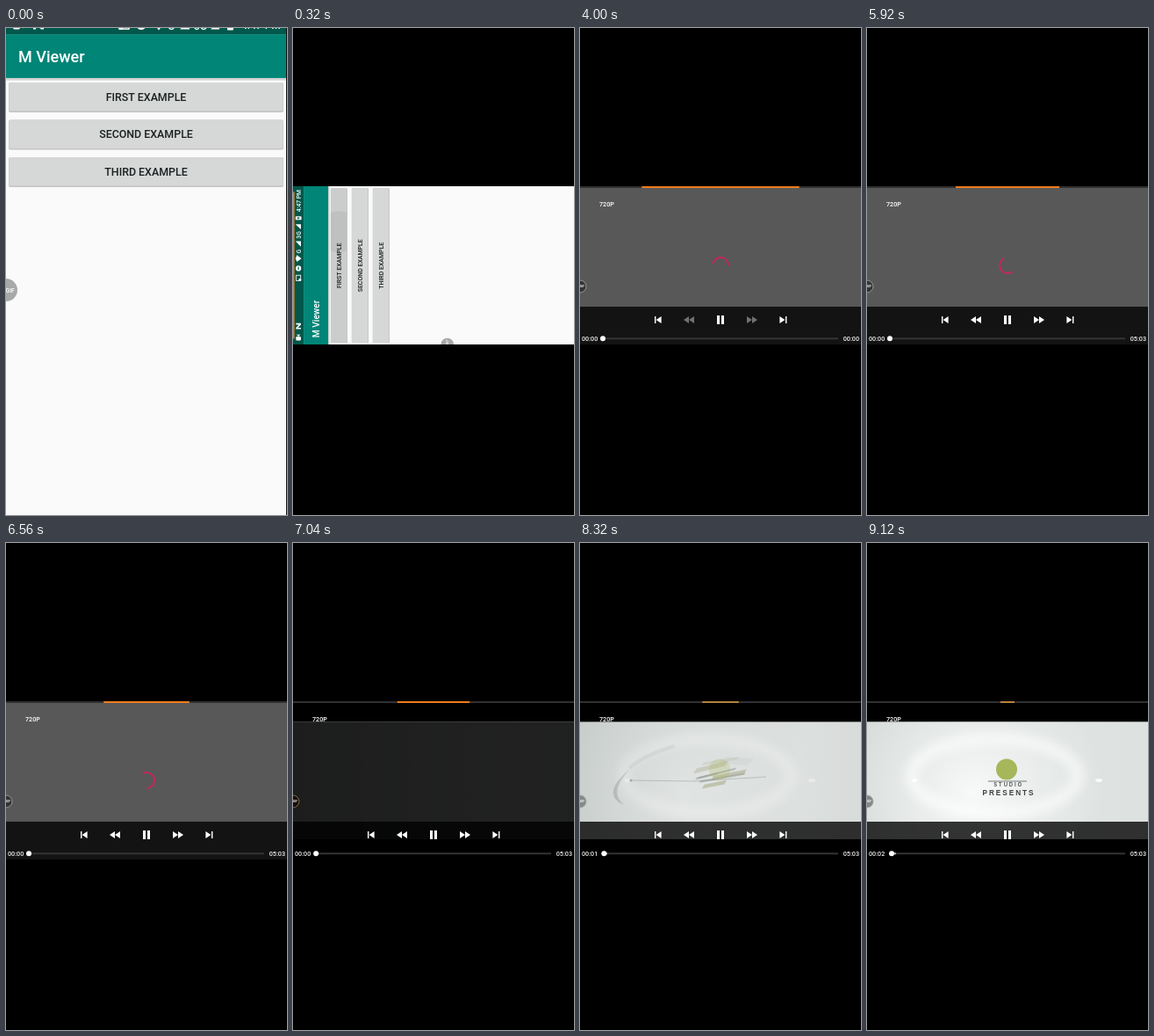
Write an HTML page with a canvas that moves like this. It is 320x554 px and loops after 9.44 s.

```html
<!DOCTYPE html>
<html lang="en">
<head>
<meta charset="utf-8">
<title>Player demo</title>
<style>
html, body { margin: 0; width: 100%; height: 100%; overflow: hidden; background: #000; }
canvas { display: block; width: 320px; height: 554px; }
</style>
</head>
<body>
<canvas id="stage" width="320" height="554"></canvas>
<script>
const c = document.getElementById('stage').getContext('2d');
const LOOP = 9440, STEP = 160, RAD = Math.PI / 180, UNIT_H = 569;
const FIRST_TURN = 0.481, VIDEO_TOP = 203.6, VIDEO_H = 133.4;
const clamp = (v, lo = 0, hi = 1) => Math.min(hi, Math.max(lo, v));
const mix = (a, b, k) => a + (b - a) * k;
const ramp = (t, from, length) => clamp((t - from) / length);

function rect(x, y, w, h, color) {
  c.fillStyle = color;
  c.fillRect(x, y, w, h);
}
function rounded(x, y, w, h, r, color) {
  c.fillStyle = color;
  c.beginPath();
  c.roundRect(x, y, w, h, r);
  c.fill();
}
function disc(x, y, r, color, ry = r) {
  c.fillStyle = color;
  c.beginPath();
  c.ellipse(x, y, r, ry, 0, 0, 7);
  c.fill();
}
function poly(points, color) {
  c.fillStyle = color;
  c.beginPath();
  for (let i = 0; i < points.length; i += 2) c.lineTo(points[i], points[i + 1]);
  c.fill();
}
function text(s, x, y, size, color, align = 'left', weight = 500, family = 'Roboto') {
  c.font = `${weight} ${size}px ${family}, sans-serif`;
  c.textAlign = align;
  c.fillStyle = color;
  c.fillText(s, x, y);
}
function layer(draw) {
  c.save();
  draw();
  c.restore();
}
function clipTo(x, y, w, h) {
  c.beginPath();
  c.rect(x, y, w, h);
  c.clip();
}

// The recorder's countdown bar, as a share of the screen width
const timeLeft = t => (9620 - t) * 0.0319 / 320;

function bubble(x, y, r, fill, ring) {
  disc(x, y, r, fill);
  if (ring) {
    c.strokeStyle = ring;
    c.lineWidth = 0.8;
    c.stroke();
  }
  text('GIF', x + r * 0.36, y + r * 0.2, r * 0.52, '#fff', 'center');
}

function statusBar() {
  const w = '#fff';
  rect(0, 0, 320, 21.5, '#00574b');
  rounded(8, 6, 8, 10, 2, w);
  poly([16, 11, 20, 7, 20, 15], w);
  poly([31, 16, 31, 6, 34, 6, 40, 12, 40, 6, 43, 6, 43, 16, 40, 16, 34, 10, 34, 16], w);
  c.strokeStyle = w;
  c.lineWidth = 1.5;
  c.strokeRect(129, 6.5, 11, 9);
  disc(131, 14, 2.5, w);
  disc(154, 11, 5.5, w);
  rect(151, 10, 6, 2, '#00574b');
  poly([167, 8, 174, 5, 181, 8, 174, 17], w);
  text('G', 184, 16, 12, w);
  poly([198, 16, 209, 16, 209, 5], w);
  text('3G', 214, 16, 12, w);
  poly([233, 16, 243, 16, 243, 5], w);
  rounded(252, 5, 7, 12, 1, w);
  rect(254, 9, 3, 4, '#00574b');
  text('4:47 PM', 268, 15.5, 12, w);
}

// The list screen, 320 units wide
function listScreen(t, pressed) {
  rect(0, 0, 320, UNIT_H, '#fafafa');
  rect(0, 71, 320, 3, '#d4d4d4');
  rect(0, 21.5, 320, 49.8, '#008577');
  statusBar();
  text('M Viewer', 14, 53.5, 18, '#fff');
  ['FIRST', 'SECOND', 'THIRD'].forEach((name, i) => {
    const y = 76.3 + i * 42.6;
    rounded(3, y, 313, 34, 2, '#c4c4c4');
    rounded(3.5, y, 312, 32.4, 2, pressed && !i ? '#cbcccc' : '#d6d7d7');
    if (pressed && !i) layer(() => {
      clipTo(3.5, y, 312, 32.4);
      disc(228, y + 16, 42, '#bfc0c0');
    });
    text(name + ' EXAMPLE', 159.5, y + 20.8, 12.4, '#1b2020', 'center');
  });
  bubble(0, 312.5, 13, '#a6a9a8');
  if (t >= STEP) {
    const w = 320 * timeLeft(t);
    rect(160 - w / 2, 0, w, 3, '#e07a20');
  }
}

function strip(x, y, w, h, angle, color) {
  layer(() => {
    c.translate(x, y);
    c.rotate(angle * RAD);
    poly([-w / 2, h / 2, -w / 2 + h, -h / 2, w / 2, -h / 2, w / 2 - h, h / 2], color);
  });
}

const shards = [
  [144, 253, 42, 5, -27, '#b4b69b'], [174, 265, 42, 4, -22, '#a3a682'],
  [150, 281, 30, 4, -22, '#a0a378'], [154, 263, 46, 2, -28, '#89908c'],
  [163, 270, 54, 2, -20, '#8c9286'], [138, 267, 28, 2, -28, '#959b94'],
  [160, 243, 44, 3, -18, 'rgba(170,176,160,.45)'], [186, 243, 40, 8, 10, 'rgba(175,181,174,.3)']
];

function flyingParts(t) {
  const gather = ramp(t, 7840, 960), away = Math.min(0, (t - 7840) / 960);
  c.globalAlpha = 1 - gather;
  c.filter = 'blur(0.7px)';
  const spread = 1 - gather * 0.6 - away * 1.2;
  for (const [x, y, w, h, a, color] of shards)
    strip(160 + (x - 160) * spread, 260 + (y - 260) * spread, w, h, a * (1 - gather), color);

  c.strokeStyle = 'rgba(80,90,86,.5)';
  c.lineWidth = 1;
  c.beginPath();
  c.moveTo(57, 270);
  c.lineTo(130, 271);
  c.lineTo(212, 266);
  c.stroke();
  disc(58, 270, 1.6, '#7c8581');
  c.fillStyle = 'rgba(135,145,140,.75)';
  c.beginPath();
  c.moveTo(50, 298);
  c.bezierCurveTo(32, 290, 34, 276, 57, 257);
  c.bezierCurveTo(40, 275, 38, 287, 50, 298);
  c.fill();
  c.strokeStyle = 'rgba(155,163,159,.3)';
  c.lineWidth = 4;
  c.beginPath();
  c.moveTo(56, 256);
  c.quadraticCurveTo(75, 240, 108, 231);
  c.stroke();
}

function titleCard(t) {
  c.globalAlpha = ramp(t, 8160, 640);
  disc(159, 257.5, 12, '#a6b65a');
  c.globalAlpha = ramp(t, 8320, 640);
  rect(138, 270.5, 44, 1, '#777d78');
  c.letterSpacing = '1.8px';
  text('STUDIO', 161, 277.3, 6, '#555b57', 'center', 700, 'Inter');
  c.letterSpacing = '2px';
  text('PRESENTS', 161.5, 286.5, 8.2, '#3c403e', 'center', 700, 'Liberation Sans');
  c.letterSpacing = '0px';
}

function softLight(x, y, r, color, alpha) {
  const g = c.createRadialGradient(x, y, 0, x, y, r);
  g.addColorStop(0, `rgba(${color},${alpha})`);
  g.addColorStop(1, `rgba(${color},0)`);
  rect(0, 203, 320, 134, g);
}

function video(t) {
  const light = ramp(t, 6600, 1250) ** 1.8, glow = ramp(t, 7840, 1100);
  layer(() => {
    clipTo(0, VIDEO_TOP, 320, VIDEO_H);
    const g = c.createLinearGradient(0, 0, 320, 0);
    g.addColorStop(0, '#bbc0be');
    g.addColorStop(0.5, '#cdd1cf');
    g.addColorStop(0.8, '#d9dbda');
    g.addColorStop(1, '#d3d5d5');
    rect(0, 203, 320, 134, g);
    rect(0, 203, 320, 134, `rgba(226,231,229,${0.7 * glow})`);
    softLight(120, 285, 150, '255,255,255', 0.8 * glow);
    layer(() => {
      c.globalAlpha = glow * 0.6;
      c.filter = 'blur(6px)';
      c.strokeStyle = '#fff';
      c.lineWidth = 14;
      c.beginPath();
      c.ellipse(145, 265, 95, 42, 0, 0, 7);
      c.stroke();
    });
    layer(() => {
      c.globalAlpha = glow * 0.8;
      disc(264, 270, 4, '#fff', 2);
      disc(54, 270, 3, '#fff', 2);
    });
    if (t > 7200) layer(() => flyingParts(t));
    if (t > 8160) layer(() => titleCard(t));
    rect(0, 203, 320, 134, `rgba(0,0,0,${1 - light})`);
  });
}

function spinner(t) {
  const age = t - 5920;
  const start = 50 + age * 0.3, sweep = 195 + 75 * Math.sin(age / 1333 * 2 * Math.PI);
  c.strokeStyle = '#c2285f';
  c.lineWidth = 2;
  c.beginPath();
  c.arc(160, 270, 9, start * RAD, (start + sweep) * RAD);
  c.stroke();
}

function controls(ready) {
  const w = '#fff', seek = ready ? w : 'rgba(255,255,255,.4)';
  const arrow = (x, dir, color, len = 6) =>
    poly([x, 332, x - dir * len, 328, x - dir * len, 336], color);
  rect(85, 328, 1.4, 8, w);
  arrow(86.6, -1, w);
  arrow(118, -1, seek);
  arrow(124, -1, seek);
  rect(156, 327, 3, 10, w);
  rect(161, 327, 3, 10, w);
  arrow(196, 1, seek);
  arrow(202, 1, seek);
  arrow(233.4, 1, w);
  rect(234, 328, 1.4, 8, w);
}

// Landscape player; solid runs from see-through (0) to opaque (1)
function player(t, solid) {
  const playing = t >= 6720, ready = t >= 4640;
  if (playing) {
    rect(0, 180, 320, 180, '#000');
    video(t);
  } else {
    rect(0, 180, 320, 180, `rgba(88,88,88,${mix(0.47, 1, solid)})`);
  }
  rect(0, 317, 320, 43, `rgba(0,0,0,${mix(0.24, 0.79, solid)})`);

  rect(0, 180, 320, 2, `rgba(48,48,48,${mix(0.3, 1, solid)})`);
  const bar = 320 * timeLeft(t);
  layer(() => {
    c.globalAlpha = mix(0.75, 1, solid);
    rect(160 - bar / 2, 180, bar, mix(1.5, 2, solid), t < 7680 ? '#ef7b1d' : '#b5833f');
  });

  text('720P', 22, 203, 7.2, '#fff');
  if (!playing && solid === 1) spinner(t);
  controls(ready);

  const played = playing ? Math.max(0, (t - 6800) / 1000) : 0;
  const thumb = 26 + 268 * played / 303;
  rect(26, 352.3, 268, 2, solid < 1 ? 'rgba(190,190,190,.5)' : '#343434');
  if (played) rect(26, 352.3, 1 + played * 2.6, 2, '#bbb');
  disc(thumb, 353.3, 3, '#fff');
  text('00:0' + Math.floor(played), 2, 355.8, 7.2, '#eee');
  text(ready ? '05:03' : '00:00', 318, 355.8, 7.2, '#eee', 'right');

  if (solid === 1) {
    const bright = t >= 7520;
    bubble(0, 294, 7, bright ? '#858a87' : playing ? '#15110e' : '#353535',
      bright ? '#9da29f' : playing ? '#a87c55' : '#aaa');
  }
}

// Turn from portrait to landscape: turn 0 is upright sideways, 1 is done
function turningScreen(t, turn, pressed) {
  const w = mix(180, 320, turn), h = mix(320, 180, turn);
  layer(() => {
    clipTo(0, 180, 320, 180);
    c.translate(160, 270);
    c.rotate(-90 * (1 - turn) * RAD);
    clipTo(-w / 2, -h / 2, w, h);
    layer(() => {
      c.scale(w / 320, h / UNIT_H);
      c.translate(-160, -UNIT_H / 2);
      listScreen(t, pressed);
    });
    if (!turn) return;
    const solid = ramp(turn, FIRST_TURN, 1 - FIRST_TURN);
    const shade = `rgba(0,0,0,${mix(0.47, 1, solid)})`;
    rect(-200, -200, 400, 110, shade);
    rect(-200, 90, 400, 110, shade);
    c.translate(-160, -270);
    player(t, solid);
  });
}

function draw(t) {
  rect(0, 0, 320, 554, '#000');
  if (t < 160) {
    layer(() => {
      c.translate(0, -14.4);
      listScreen(t, false);
    });
    rect(319, 0, 1, 554, '#111');
  } else if (t < 3040) {
    turningScreen(Math.min(t, 320), 0, t >= 320);
  } else if (t < 3360) {
    turningScreen(t, 1 - (1 - FIRST_TURN) * (1 - (t - 3040) / 320) ** 2, false);
  } else {
    player(t, 1);
  }
}

const begin = performance.now();
function tick() {
  const t = (performance.now() - begin) % LOOP;
  draw(Math.min(9120, Math.floor(t / STEP) * STEP));
  requestAnimationFrame(tick);
}
tick();
</script>
</body>
</html>
```
